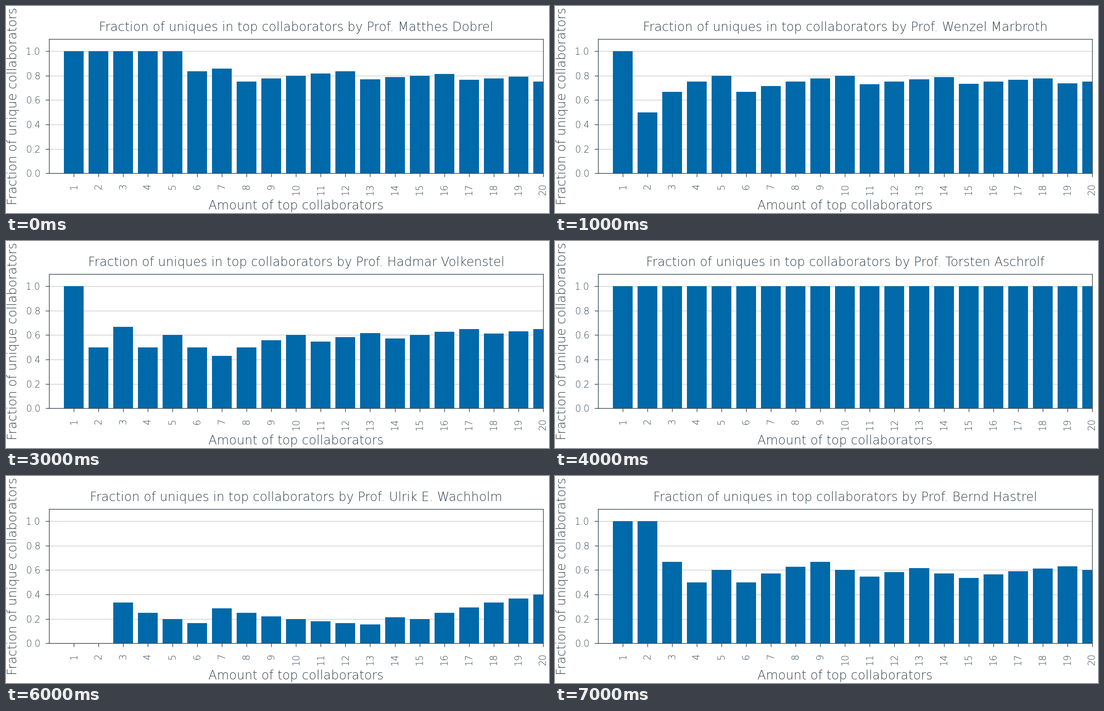
Animation, 1210 px wide and 463 px high, one loop 8 s. Source, as a matplotlib script:

```python
import numpy as np
import matplotlib.pyplot as plt
from matplotlib.animation import FuncAnimation
from matplotlib.patheffects import Stroke
from matplotlib.textpath import TextPath

W, H, DPI = 1210, 463, 128
PX = 72 / DPI  # points per pixel
FONT = "DejaVu Sans"
DARK, BLUE, GRID = "#32414b", "#0069aa", "#cccccc"
LABEL_SIZE, TICK_SIZE, LINE = 27.78, 20.83, 1.39
LEFT, RIGHT, TOP, BOTTOM = 96.3, 1196.6, 73.5, 374.3

# One flag per ranked collaborator: 1 when nobody else shares that person.
PROFESSORS = [
    ("Matthes Dobrel", "11111010111101110110"),
    ("Wenzel Marbroth", "10111011110111011101"),
    ("Matthes Vurl", "11011111110111111100"),
    ("Hadmar Volkenstel", "10101001110110111011"),
    ("Torsten Aschrolf", "11111111111111111111"),
    ("Mirelonda Tasheci", "01001111100111111111"),
    ("Ulrik E. Wachholm", "00100010000001011111"),
    ("Bernd Hastrel", "11001011100110011110"),
]
RANKS = np.arange(1, 21)


def fractions(flags):
    return np.cumsum([int(c) for c in flags]) / RANKS


def sample_width(weight):
    prop = {"family": FONT, "weight": weight}
    return TextPath((0, 0), "lll", size=100, prop=prop).get_extents().width


HAS_LIGHT = abs(sample_width("light") - sample_width("normal")) > 0.5


def thin(text, size):
    """Use the light face, or trim the regular one to a similar weight."""
    text.set(family=FONT, fontsize=size * PX, color=DARK)
    if HAS_LIGHT:
        text.set_fontweight("light")
    else:
        trim = Stroke(linewidth=0.042 * size * PX, foreground="white")
        text.set_path_effects([trim])
    return text


def label(x, y, s, rotation=0):
    text = fig.text(x / W, 1 - y / H, s, ha="center", va="baseline",
                    rotation=rotation, rotation_mode="anchor")
    return thin(text, LABEL_SIZE)


fig = plt.figure(figsize=(W / DPI, H / DPI), dpi=DPI, facecolor="white")
ax = fig.add_axes([LEFT / W, 1 - BOTTOM / H,
                   (RIGHT - LEFT) / W, (BOTTOM - TOP) / H])
bars = ax.bar(RANKS, np.zeros(20), width=0.8, color=BLUE, linewidth=0)
ax.set(xlim=(0, 20), ylim=(0, 1.1))
ax.set_xticks(RANKS, [str(r) for r in RANKS], rotation=90)
levels = np.arange(6) / 5
ax.set_yticks(levels, [f"{v:.1f}" for v in levels])
ax.tick_params(length=8.3 * PX, width=LINE * PX, color=DARK)
ax.tick_params(axis="x", pad=14.5 * PX)
ax.tick_params(axis="y", pad=11.5 * PX)
ax.set_axisbelow(True)
ax.grid(axis="y", color=GRID, linewidth=LINE * PX)
for spine in ax.spines.values():
    spine.set(color=DARK, linewidth=LINE * PX)
for tick_label in ax.get_xticklabels() + ax.get_yticklabels():
    thin(tick_label, TICK_SIZE)

mid_x, mid_y = (LEFT + RIGHT) / 2, (TOP + BOTTOM) / 2
title = label(mid_x, 56, "")
label(mid_x, 455, "Amount of top collaborators")
label(24.5, mid_y, "Fraction of unique collaborators", rotation=90)


def update(i):
    name, flags = PROFESSORS[i]
    title.set_text(f"Fraction of uniques in top collaborators by Prof. {name}")
    for bar, value in zip(bars, fractions(flags)):
        bar.set_height(value)
    return [title, *bars]


anim = FuncAnimation(fig, update, frames=len(PROFESSORS), interval=1000,
                     repeat=True, repeat_delay=0, blit=False)
plt.show()
```
